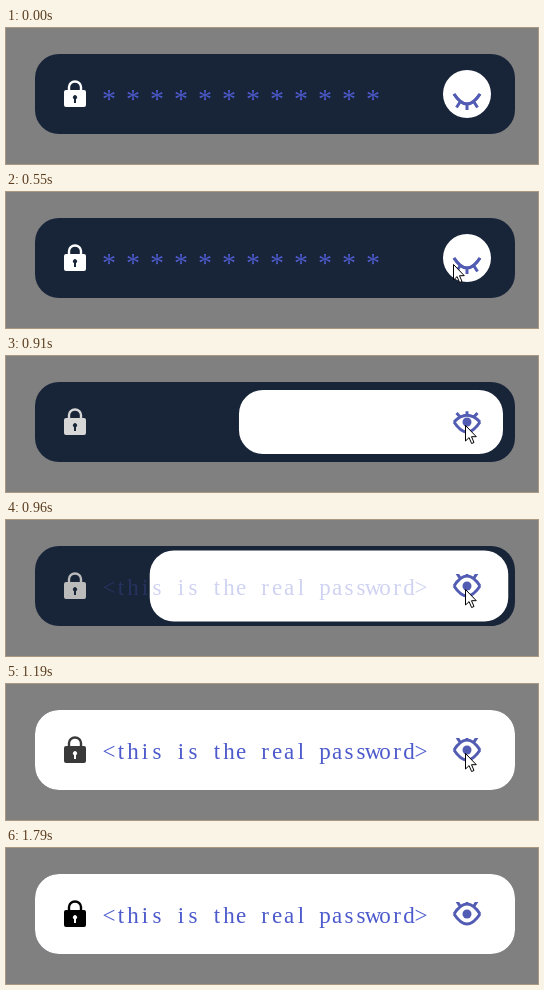
An HTML page that plays this animation: 532x136 px, repeating every 2350 ms.

```html
<!DOCTYPE html>
<html lang="en">
<head>
<meta charset="utf-8">
<title>Password reveal</title>
<style>
  html, body { margin: 0; width: 100%; height: 100%; overflow: hidden; background: #808080; }
  svg { display: block; }
  text { font-family: "Liberation Serif", "Times New Roman", serif; text-anchor: middle; fill: #4c5acb; }
  #stars { font-size: 28px; }
  #secret { font-size: 23px; }
  .line { fill: none; stroke: #525cb3; stroke-width: 3; }
</style>
</head>
<body>
<svg width="532" height="136" viewBox="0 0 532 136">
  <defs>
    <clipPath id="eyeBox"><rect x="446" y="54" width="30" height="28"/></clipPath>
    <clipPath id="gap"><path id="gapShape"/></clipPath>
  </defs>
  <rect x="29" y="26" width="480" height="80" rx="24" fill="#182438"/>
  <rect id="light" rx="24" fill="#fff"/>
  <g id="lock">
    <path d="M63 63v-4a6 5.5 0 0 1 12 0v4" fill="none" stroke="currentColor" stroke-width="2.4"/>
    <path fill="currentColor" fill-rule="evenodd" d="M60 62h18q2 0 2 2v13q0 2-2 2H60q-2 0-2-2V64q0-2 2-2ZM68 71v4h2v-4a2 2 0 1 0-2 0Z"/>
  </g>
  <text id="stars" y="79.7"></text>
  <text id="secret" y="75"></text>
  <g clip-path="url(#eyeBox)">
    <path class="line" d="M448 66Q461 86 474 66"/>
    <path class="line" id="lid"/>
    <g clip-path="url(#gap)"><circle cx="461" cy="66" r="4.5" fill="#525cb3"/></g>
  </g>
  <path id="cursor" d="M.5.5v15.5l3.6-3.4 2.5 5.9 2.4-1-2.5-5.8h4.8Z" fill="#fff" stroke="#000"/>
</svg>
<script>
const LOOP = 2350;
// moments at which the screen refreshes
const TICKS = [0, 160, 220, 270, 330, 380, 440, 490, 550, 610, 670, 720, 790, 850, 910,
  960, 1020, 1080, 1140, 1190, 1250, 1310, 1670, 1730, 1790];
const $ = id => document.getElementById(id);
const mix = (a, b, p) => a + (b - a) * p;
const span = (t, from, to) => Math.min(1, Math.max(0, (t - from) / (to - from)));
const set = (id, attrs) => {
  for (const k in attrs) $(id).setAttribute(k, attrs[k]);
};

// CSS "ease": cubic-bezier(.25, .1, .25, 1)
function ease(x) {
  const curve = (a, b, u) => 3 * a * u * (1 - u) ** 2 + 3 * b * u * u * (1 - u) + u ** 3;
  let lo = 0, hi = 1;
  for (let i = 0; i < 20; i++) {
    const mid = (lo + hi) / 2;
    if (curve(.25, .25, mid) < x) lo = mid; else hi = mid;
  }
  return curve(.1, 1, hi);
}

// one character per 12px cell
function typeset(id, str) {
  $(id).textContent = str;
  set(id, { x: [...str].map((_, i) => 103 + 12 * i).join(" ") });
}

function pointer(t) {
  if (t < 160 || t >= 1790) return null;
  if (t >= 1670) return t < 1730 ? [448, 88] : [425, 122];
  const left = 1 - span(t, 160, 690);
  return [459 - 69 * left ** 1.3, 69 + 61 * left ** 2.2];
}

function draw(t) {
  const grow = ease(span(t, 800, 1175));
  const left = mix(437, 29, grow), top = mix(42, 26, grow);
  set("light", {
    x: left, y: top,
    width: mix(485, 509, grow) - left,
    height: mix(90, 106, grow) - top
  });

  const shade = Math.round(255 * (1 - span(t, 840, 1290)));
  set("lock", { color: `rgb(${shade},${shade},${shade})` });
  set("stars", { opacity: 1 - span(t, 795, 905) });
  set("secret", { opacity: span(t, 910, 1100) });

  // the lid and its lashes flip from below the eye to above it
  const flip = mix(1, -1, span(t, 785, 935));
  const y = d => 66 + d * flip;
  set("lid", {
    d: `M448 66Q461 ${y(20)} 474 66M461 ${y(10)}V${y(16)}` +
       `M454 ${y(8)}L450.5 ${y(13.5)}M468 ${y(8)}L471.5 ${y(13.5)}`
  });
  set("gapShape", { d: `M448 66Q461 ${y(20)} 474 66Q461 86 448 66Z` });

  const tip = pointer(t);
  set("cursor", {
    visibility: tip ? "visible" : "hidden",
    transform: `translate(${(tip || [0, 0]).map(Math.round)})`
  });
}

typeset("stars", Array(12).fill("*").join(" "));
typeset("secret", "<this is the real password>");

const start = performance.now();
function loop() {
  const t = (performance.now() - start) % LOOP;
  draw(TICKS.findLast(tick => tick <= t));
  requestAnimationFrame(loop);
}
loop();
</script>
</body>
</html>
```
